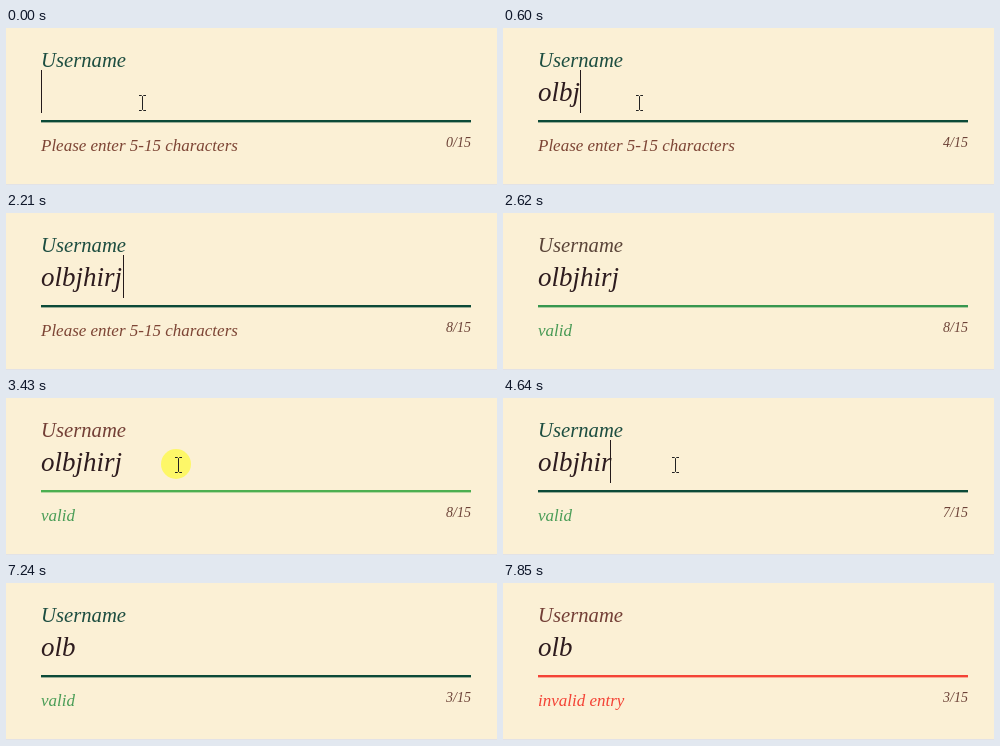
These frames come from a looping animation (491 px wide and 157 px high, 8.86 s). An HTML page:

```html
<!DOCTYPE html>
<html lang="en">
<head>
<meta charset="utf-8">
<title>Text field validation</title>
<style>
  html, body { margin: 0; width: 100%; height: 100%; overflow: hidden; background: #fbf0d5; }
  svg { display: block; width: 100%; height: 100%; }
  text { font-family: "Liberation Serif", "Times New Roman", serif; font-style: italic; }
</style>
</head>
<body>
<svg viewBox="0 0 491 157">
  <rect width="491" height="157" fill="#fbf0d5"/>
  <rect y="156" width="491" height="1" fill="#e2e2e6"/>
  <text id="label" x="35" y="39" font-size="20.7">Username</text>
  <text id="value" x="35" y="73" font-size="27" fill="#2e1c1f"></text>
  <rect id="line" x="35" y="92" width="430" height="2.4"/>
  <text id="helper" x="35" y="123" font-size="17"></text>
  <text id="counter" x="465" y="119" font-size="14" fill="#6d4338" text-anchor="end"></text>
  <circle id="halo" r="15" fill="#fdf768"/>
  <rect id="caret" y="42" width="1" height="43" fill="#241a1a"/>
  <path id="beam" d="M-3.5-7.5h2.5l1 1 1-1h2.5M0-6.5v13M-3.5 7.5h2.5l1-1 1 1h2.5" fill="none" stroke="#222"/>
  <path id="arrow" d="M0 0v13l3-3 2 5 2-1-2-5h4z" fill="#fff" stroke="#222"/>
</svg>
<script>
const LOOP = 8860;
const ENTRY = "olbjhirj";
const CARET_X = [35, 48, 55, 68, 77, 90, 97, 107, 117];
const HINT = "Please enter 5-15 characters";

const modes = {
  hint:      { label: "#1c4d40", line: "#0b4a38", helper: "#7d4535", text: HINT },
  turnValid: { label: "#5a4438", line: "#37974f", helper: "#489a55", text: "valid" },
  valid:     { label: "#733f36", line: "#4caf50", helper: "#4a9d57", text: "valid" },
  editing:   { label: "#1c4d40", line: "#0b4a38", helper: "#4a9d57", text: "valid" },
  turnBad:   { label: "#584338", line: "#cc4438", helper: "#e8483a", text: "invalid entry" },
  invalid:   { label: "#733f36", line: "#f44336", helper: "#f44336", text: "invalid entry" }
};

const pointers = {
  start: { shape: "beam", x: 136, y: 75 },
  away:  { shape: "arrow", x: 465, y: 133, halo: [464, 132] },
  back:  { shape: "beam", x: 172, y: 67 },
  click: { shape: "beam", x: 172, y: 67, halo: [170, 66] },
  leave: { shape: "beam", x: 407, y: 86 },
  none:  {}
};

// start time, typed characters, caret visible, pointer, mode
const steps = [
  [0, 0, 1, "start", "hint"],
  [200, 1, 1, "start", "hint"],
  [400, 3, 1, "start", "hint"],
  [600, 4, 1, "start", "hint"],
  [800, 5, 1, "start", "hint"],
  [1010, 7, 1, "start", "hint"],
  [1210, 8, 1, "start", "hint"],
  [1610, 8, 0, "start", "hint"],
  [2020, 8, 1, "away", "hint"],
  [2210, 8, 1, "none", "hint"],
  [2620, 8, 0, "none", "turnValid"],
  [2820, 8, 0, "none", "valid"],
  [3230, 8, 0, "back", "valid"],
  [3430, 8, 0, "click", "valid"],
  [3630, 8, 1, "back", "editing"],
  [4040, 8, 0, "back", "editing"],
  [4640, 7, 1, "back", "editing"],
  [4840, 6, 1, "back", "editing"],
  [5040, 5, 1, "back", "editing"],
  [5230, 4, 1, "back", "editing"],
  [5640, 3, 1, "back", "editing"],
  [6240, 3, 0, "back", "editing"],
  [6640, 3, 1, "leave", "editing"],
  [6830, 3, 1, "none", "editing"],
  [7240, 3, 0, "none", "editing"],
  [7650, 3, 0, "none", "turnBad"],
  [7850, 3, 0, "none", "invalid"]
];

const el = id => document.getElementById(id);
const set = (id, name, v) => el(id).setAttribute(name, v);
const show = (id, on) => set(id, "visibility", on ? "visible" : "hidden");
const place = (id, x, y) => set(id, "transform", `translate(${x} ${y})`);

function render(time) {
  const t = time % LOOP;
  const [, count, caretOn, pointerName, modeName] = steps.findLast(step => step[0] <= t);
  const mode = modes[modeName];
  const pointer = pointers[pointerName];

  for (const id of ["label", "line", "helper"]) set(id, "fill", mode[id]);
  el("helper").textContent = mode.text;
  el("value").textContent = ENTRY.slice(0, count);
  el("counter").textContent = `${count}/15`;

  set("caret", "x", CARET_X[count]);
  show("caret", caretOn);
  for (const shape of ["beam", "arrow"]) {
    const on = pointer.shape === shape;
    show(shape, on);
    if (on) place(shape, pointer.x + 0.5, pointer.y);
  }
  show("halo", pointer.halo);
  if (pointer.halo) place("halo", ...pointer.halo);
}

const start = performance.now();
function tick() {
  render(performance.now() - start);
  requestAnimationFrame(tick);
}
tick();
</script>
</body>
</html>
```
